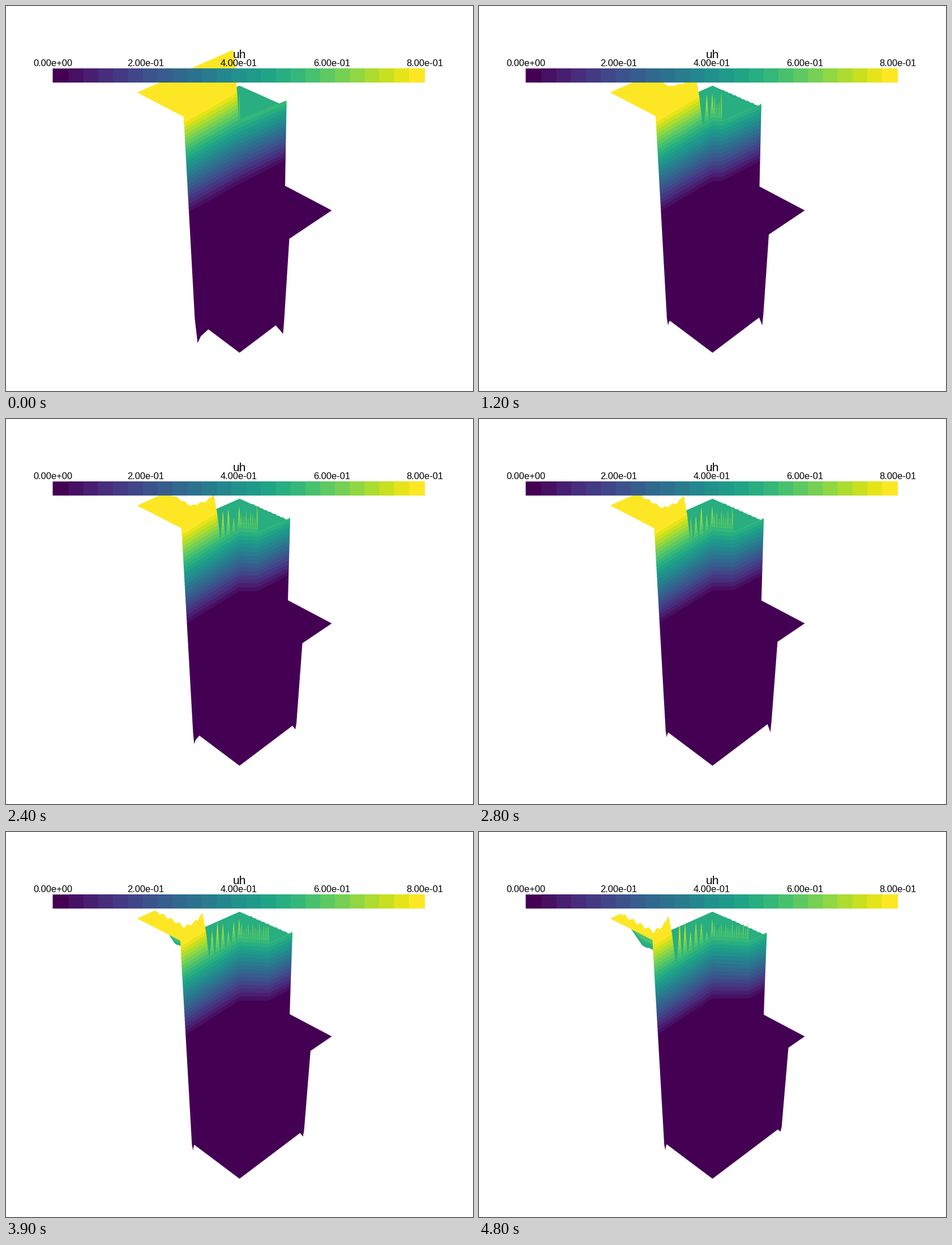
These frames come from a looping animation (825 by 679 pixels, 4.9 s). A matplotlib script:

```python
import numpy as np
import matplotlib
import matplotlib.pyplot as plt
from matplotlib.animation import FuncAnimation

W, H, DPI = 825, 679, 64
FRAMES, STEP_MS = 49, 100
LEVELS = 25
COLORS = matplotlib.colormaps["viridis"](np.linspace(0, 1, LEVELS))

X = np.arange(231, 512.5, 0.5)
WALL = X >= 300


def mix(a, b, u):
    return a + (b - a) * u


def left_edge(y, k):
    return np.interp(y, [197, 551], [313.5 - 0.15 * k, 333 - 0.13 * k])


def right_edge(y, k):
    return np.interp(y, [177, 316.5], [495 + 0.27 * k, 492.5 + 0.21 * k])


def corner(k):
    """Upper left corner of the wall."""
    return 313.5 - 0.15 * k, 195 - 0.1 * k


def fronts(k):
    """The two ends of the rippled zone, running apart from the middle."""
    return 411 - 1.35 * k, 412 + 1.33 * k


def contour(level, k):
    """Lower border of a colour level along the wall."""
    mid = 313 - 0.42 * k
    dark = np.interp(X, [300, 412, fronts(k)[1] + 0.1, 512],
                     [375 - 0.18 * k, mid, mid, 262 + 0.25 * k])
    gap = np.interp(X, [310, 412, 495], [7.0, 7.1 - 0.005 * k, 6.5])
    return dark - (level - 1) * gap


def crest(k):
    """Back rim of the yellow plateau: ridge, saddle, peak, drop to a valley."""
    settle = 1 - np.exp(-k / 1.5)
    end = fronts(k)[0]
    ridge = mix(400, 318 - 1.42 * k, settle)
    sx, sy = mix(402, 345 - 0.75 * k, settle), mix(90, 130 + 0.95 * k, settle)
    px, py = mix(406, end - 12, settle), mix(130, 118 + 0.6 * k, settle)
    bottom = 210 + 0.27 * k
    y = np.interp(X, [231, ridge, sx, mix(sx, px, 0.7), px, (px + end) / 2, end],
                  [152, 152 - 0.444 * (ridge - 231), sy, mix(sy, py, 0.45), py,
                   mix(py, bottom, 0.4), bottom])
    ripple = 0.06 * k * np.sin(0.45 * X + 0.3 * k)
    return y + np.where((X > ridge + 6) & (X < px - 6), ripple, 0)


def spike(x0, top, half, base):
    d = np.clip(1 - np.abs(X - x0) / half, 0, 1)
    return base - np.maximum(base - top, 0) * d ** 1.3


def profile(k, burst):
    """Upper outline of the front surface."""
    start, stop = fronts(k)
    base = contour(16.5, k)
    y = base.copy()
    half = 1.8 + 3 * min(1, k / 12)
    for j in range(int((413 - start) / 9.6) + 1):
        top = 153 + 10 * min(j, 1) * (1 + np.sin(2.1 * j + 0.25 * k))
        y = np.minimum(y, spike(411.5 - 9.6 * j, top, half, base))
    count = int((stop - 412) / 3.9)
    for j in range(1, count + 1):
        top = 164 + 7 * np.sin(2.4 * j + 0.7 * k) - 10 * (j == count)
        y = np.minimum(y, spike(412 + 3.9 * j, top, 2.2, base))
    y = np.where(X > stop + 1.5, contour(16, k) - 2 - 5 * burst, y)
    return np.where(X <= start, crest(k), y)


def on_wall(x, y, k):
    return np.column_stack([np.clip(x, left_edge(y, k), right_edge(y, k)), y])


fig = plt.figure(figsize=(W / DPI, H / DPI), dpi=DPI, facecolor="white")
ax = fig.add_axes([0, 0, 1, 1])
# whole coordinates fall on pixel centres
ax.set(xlim=(-0.5, W - 0.5), ylim=(H - 0.5, -0.5))
ax.axis("off")


def shape(color, z):
    return ax.fill([0, 0, 0], [0, 0, 0], color=color, lw=0, zorder=z)[0]


plateau = shape(COLORS[15], 1)
flap = shape(COLORS[15], 1.2)
flap_top = shape(COLORS[17], 1.3)
bands = [shape(COLORS[i], 3 - i / LEVELS) for i in range(LEVELS)]

# colour bar, each cell painted over the rest of the previous one
BAR_END = 739.5
for a, c in zip(np.r_[82, np.linspace(110, 711.5, LEVELS - 1)], COLORS):
    ax.fill([a, BAR_END, BAR_END, a], [109.7, 109.7, 134.5, 134.5],
            color=c, lw=0, zorder=5, snap=False)


def label(x, y, s, px):
    ax.text(x, y, s, fontsize=px * 72 / DPI, family="Liberation Sans",
            ha="center", va="baseline", color="black", zorder=6)


for i in range(5):
    label(82 + 164.25 * i, 105.5, f"{0.2 * i:.2e}", 16.5)
label(411.5, 92, "uh", 21)


def draw_plateau(k):
    rx, ry = 495 + 0.27 * k, 177 + 0.12 * k
    xs = np.arange(338, rx - 4, 2.0)
    ys = 140 + np.where(xs < 412, -0.444, (ry - 140) / (rx - 412)) * (xs - 412)
    ys -= min(1, k / 12) * ((xs > 430) & (np.sin(xs * 2.3 + k) > 0.2))
    tip = [[rx - 3, ry - 2], [rx - 1.5, 167 + 0.3 * k], [rx, ry]]
    low = X[(X > 338) & (X < rx)][::-1]
    bottom = np.column_stack([low, np.interp(low, X, contour(15, k)) + 1])
    plateau.set_xy(np.vstack([np.column_stack([xs, ys]), tip, bottom]))


def draw_flap(k):
    """Green underside that appears below the yellow plateau."""
    cx, cy = corner(k)
    grow = max(k - 28, 0)
    u = np.array([0, 1, 1, 0.82, 0.7, 0.5])
    drop = np.array([0, 0, 1, 1, 1.12, 1.1])
    x = cx + 1 - 1.95 * grow * (1 - u)
    y = mix(152, cy, (x - 231) / (cx - 231))
    for patch, depth in ((flap, 0.85 * grow), (flap_top, 0.42 * grow)):
        patch.set_xy(np.column_stack([x, y + depth * drop]))


def draw_bands(k, burst):
    cx, cy = corner(k)
    top = profile(k, burst)

    # top level, including the part left of the wall
    plate = mix(152, cy, (X - 231) / (cx - 231))
    low = np.maximum(np.where(X < cx, plate, contour(24, k) + 0.8), top)
    keep = X < right_edge(180, k)
    bands[24].set_xy(np.vstack([np.column_stack([X, top])[keep],
                                np.column_stack([X, low])[keep][::-1]]))

    xw = X[WALL]
    for i in range(1, LEVELS - 1):
        up = np.maximum(contour(i + 1, k), top)[WALL]
        down = np.maximum(contour(i, k) + 0.8, top)[WALL]
        bands[i].set_xy(np.vstack([on_wall(xw, up, k),
                                   on_wall(xw, down, k)[::-1]]))


def draw_base(k, burst):
    """Dark lower body with a swinging tip at each bottom corner."""
    rx, ry = 491 + 0.9 * k, 552 - 0.68 * k
    r_notch = rx - 7 - 8 * burst
    r_depth = 12 + 7 * np.cos(2 * np.pi * (k - 28) / 15) + 9 * burst

    lx = 333 - 0.13 * k
    swell = max(0, np.cos(2 * np.pi * (k - 35) / 5.5)) ** 4
    l_depth = 10 + 33 * burst + 17 * min(1, k / 35) * swell
    l_notch = lx + 3 + 0.6 * (l_depth - 8)
    l_notch_y = 611 - 0.75 * (412 - l_notch)
    l_tip = lx + 2 + 3 * burst, 551 + l_depth

    outline = [
        [492.5 + 0.21 * k, 316.5 + 0.11 * k], [575, 360],
        [500 + 0.96 * k, 410 - 0.627 * k], [rx, ry],
        [rx - 2, ry + r_depth], [r_notch, 611 - 0.754 * (r_notch - 412)],
        [412, 611], [l_notch, l_notch_y],
        [mix(l_tip[0], l_notch, 0.3), mix(l_tip[1], l_notch_y, 0.5)],
        l_tip, [lx, 551],
    ]
    dark = on_wall(X[WALL], contour(1, k)[WALL], k)
    bands[0].set_xy(np.vstack([dark, outline]))


def update(k):
    burst = np.exp(-k / 4)  # start-up disturbance dying away
    draw_plateau(k)
    draw_flap(k)
    draw_bands(k, burst)
    draw_base(k, burst)
    return [plateau, flap, flap_top, *bands]


anim = FuncAnimation(fig, update, frames=FRAMES, interval=STEP_MS,
                     init_func=lambda: update(0), repeat=True, repeat_delay=0)
plt.show()
```
